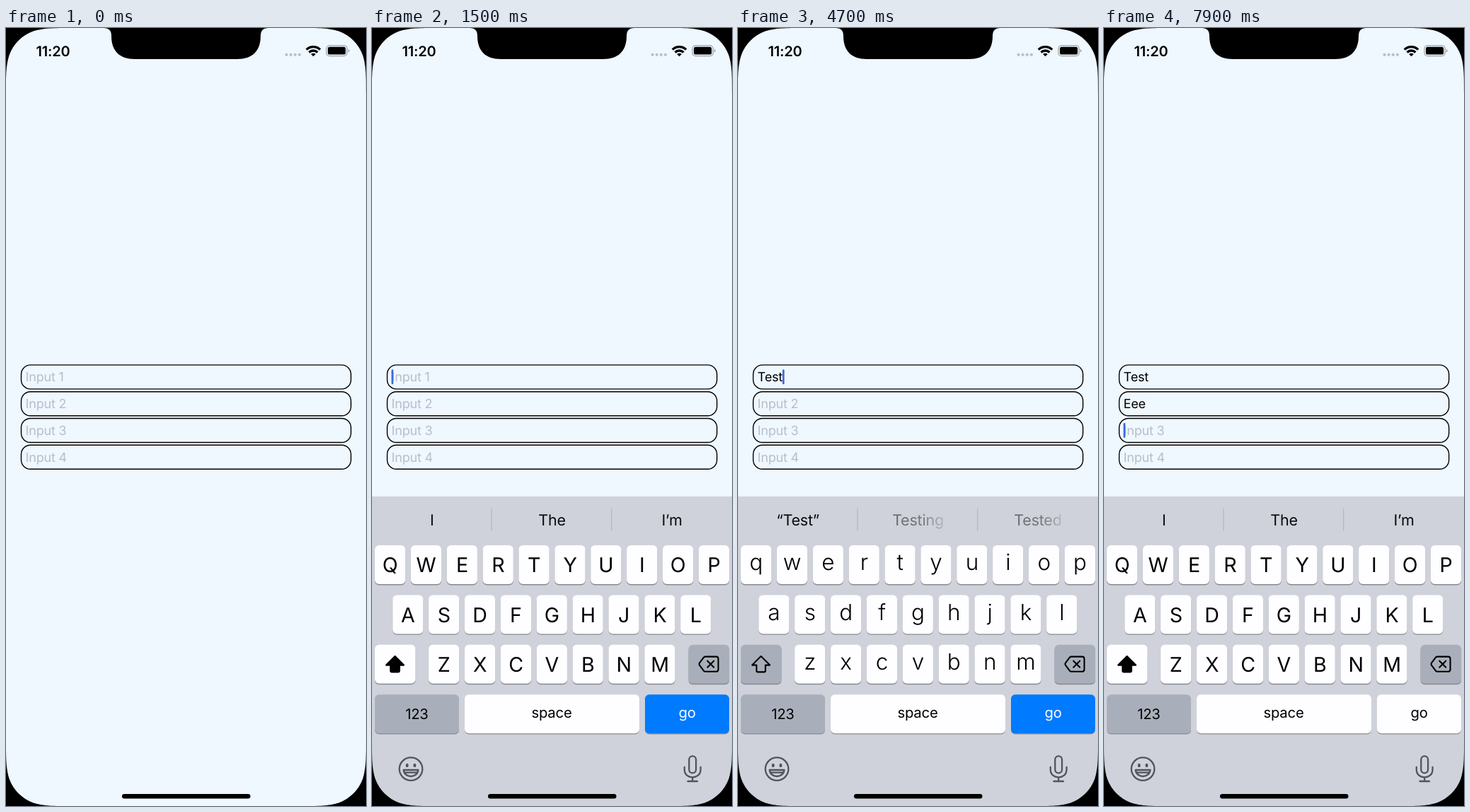
An HTML page for the animation above (8000 ms loop, 509 px wide and 1101 px high).

```html
<!DOCTYPE html>
<html lang="en">
<head>
<meta charset="utf-8">
<title>Form keyboard</title>
<style>
  html, body { margin: 0; width: 100%; height: 100%; overflow: hidden; background: #000; }
  svg { display: block; }
  text { font-family: Inter, Roboto, sans-serif; letter-spacing: -.01em; text-rendering: geometricPrecision; }
  .mid { text-anchor: middle; }
  .line { fill: none; stroke: #000; stroke-width: 2.1; stroke-linejoin: round; stroke-linecap: round; }
  .icon { fill: none; stroke: #50545b; stroke-width: 2.3; stroke-linecap: round; stroke-linejoin: round; }
</style>
</head>
<body>
<svg id="stage" width="509" height="1101" viewBox="0 0 509 1101">
  <defs>
    <linearGradient id="fade">
      <stop offset="0" stop-opacity=".5"/>
      <stop offset=".6" stop-opacity=".42"/>
      <stop offset="1" stop-opacity=".12"/>
    </linearGradient>
    <filter id="shadow" x="-20%" y="-20%" width="140%" height="140%">
      <feDropShadow dx="0" dy="1" stdDeviation="2" flood-color="#000" flood-opacity=".32"/>
    </filter>
  </defs>
  <rect width="509" height="1101" fill="#eff7ff"/>
  <g id="form"></g>
  <rect id="caret" width="2.7" height="21" rx="1.3" fill="#3b68dc"/>
  <g id="board"></g>
  <g id="status">
    <text x="42.5" y="39.8" font-size="20" font-weight="600">11:20</text>
    <g fill="#b9bfc8">
      <circle cx="396.6" cy="37.8" r="2.1"/><circle cx="402.7" cy="37.8" r="2.1"/>
      <circle cx="408.8" cy="37.8" r="2.1"/><circle cx="414.9" cy="37.8" r="2.1"/>
    </g>
    <g fill="none" stroke="#000" stroke-width="3.3">
      <path d="M424.8 30.6A13.8 13.8 0 0 1 444.2 30.6"/>
      <path d="M428.5 34.5A8.5 8.5 0 0 1 440.5 34.5"/>
    </g>
    <path d="M434.5 40.3L431.2 37A4.7 4.7 0 0 1 437.8 37Z"/>
    <rect x="453" y="24.8" width="29.2" height="14.8" rx="4.4" fill="none" stroke="#9da2a8" stroke-width="1.3"/>
    <rect x="455" y="26.8" width="25.2" height="10.8" rx="2.6"/>
    <path d="M483.8 29.8Q485.6 30.6 485.6 32.2T483.8 34.6Z" fill="#9da2a8"/>
  </g>
  <path d="M138 0Q149 0 149 11C149 33 161 44 182 44H327C348 44 360 33 360 11Q360 0 371 0Z"/>
  <rect x="164" y="1084" width="181.5" height="6.6" rx="3.3"/>
  <path id="mask" fill-rule="evenodd"/>
</svg>
<script>
const $ = id => document.getElementById(id);
const LOOP = 8000, STEP = 100;
const LIGHT = '#fefdff', GREY = '#a9afba', BLUE = '#007aff';
const PITCH = 50.87, KEY_W = 43.2, KEY_H = 55, ROW = 70.4, TOP = 732;

function add(parent, tag, attrs, text) {
  const el = document.createElementNS('http://www.w3.org/2000/svg', tag);
  set(el, attrs);
  if (text) el.textContent = text;
  parent.appendChild(el);
  return el;
}
function set(el, attrs) {
  for (const k in attrs) el.setAttribute(k, attrs[k]);
}

// Screen outline with continuous corners
function corner(x, y, sx, sy) {
  const r = 61, p = (a, b) => `${x + sx * a * r} ${y + sy * b * r}`;
  return `M${p(0, 0)}L${p(0, 1.529)}C${p(0, 1.088)} ${p(0, .868)} ${p(.075, .631)}` +
    `C${p(.169, .373)} ${p(.373, .169)} ${p(.631, .075)}` +
    `C${p(.868, 0)} ${p(1.088, 0)} ${p(1.529, 0)}Z`;
}
set($('mask'), { d: corner(0, 0, 1, 1) + corner(509, 0, -1, 1) + corner(0, 1101, 1, -1) + corner(509, 1101, -1, -1) });

// Input fields
const fieldY = i => 476.9 + i * 37.8;
const inputs = [0, 1, 2, 3].map(i => {
  add($('form'), 'rect', { x: 21.5, y: fieldY(i), width: 466.2, height: 34, rx: 13, fill: 'none', stroke: '#000', 'stroke-width': 1.4 });
  return add($('form'), 'text', { x: 27.6, y: fieldY(i) + 23.5, 'font-size': 18 });
});

// Keyboard
const board = $('board');
add(board, 'rect', { y: 663, width: 509, height: 440, fill: '#cfd2da' });
for (const x of [169, 338.7]) add(board, 'rect', { x: x - .6, y: 680, width: 1.2, height: 32, fill: '#b3b6be' });
const words = [84.7, 254.5, 424].map(x => add(board, 'text', { class: 'mid', x, y: 704, 'font-size': 21.5 }));

function cap(x, y, w, fill) {
  add(board, 'rect', { x, y: y + 1.4, width: w, height: KEY_H, rx: 6, fill: '#888a8f' });
  return add(board, 'rect', { x, y, width: w, height: KEY_H, rx: 6, fill });
}
const keys = {};
[['qwertyuiop', 4], ['asdfghjkl', 29.2], ['zxcvbnm', 80.1]].forEach(([row, left], r) => {
  [...row].forEach((ch, i) => {
    const x = left + i * PITCH, y = TOP + r * ROW;
    cap(x, y, KEY_W, LIGHT);
    keys[ch] = { x, y, label: add(board, 'text', { class: 'mid', x: x + KEY_W / 2 }) };
  });
});
const row3 = TOP + 2 * ROW, row4 = TOP + 3 * ROW;
const shiftKey = cap(4, row3, 57.5, GREY);
const arrow = add(board, 'path', { class: 'line', d: 'M32.5 889L45 901.6H38.8V909.6Q38.8 911.4 37 911.4H28Q26.2 911.4 26.2 909.6V901.6H20Z' });
cap(447.6, row3, 57.5, GREY);
add(board, 'path', { class: 'line', d: 'M471.5 889.6H486.5Q489.6 889.6 489.6 892.7V907.7Q489.6 910.8 486.5 910.8H471.5Q470 910.8 469 909.7L463 901.7Q462 900.2 463 898.7L469 890.7Q470 889.6 471.5 889.6ZM474.3 895.7L483.3 904.7M483.3 895.7L474.3 904.7' });
cap(4, row4, 119, GREY);
cap(131, row4, 247, LIGHT);
const goKey = cap(386, row4, 119, BLUE);
const label = (x, y, s) => add(board, 'text', { class: 'mid', x, y, 'font-size': 20.3 }, s);
label(63.4, 977.6, '123');
label(254, 975.6, 'space');
const goLabel = label(445.7, 975.6, 'go');

// Emoji and dictation icons
add(board, 'circle', { class: 'icon', cx: 55, cy: 1048.6, r: 16.3 });
for (const x of [49.6, 60.4]) add(board, 'ellipse', { cx: x, cy: 1043.4, rx: 2, ry: 2.7, fill: '#50545b' });
add(board, 'path', { class: 'icon', 'stroke-width': 2, d: 'M44.6 1050H65.4C64 1062 46 1062 44.6 1050ZM46 1053.6H64' });
add(board, 'rect', { class: 'icon', x: 448.3, y: 1030.4, width: 9.8, height: 24, rx: 4.9 });
add(board, 'path', { class: 'icon', d: 'M441.8 1046V1049.5C441.8 1064 464.6 1064 464.6 1049.5V1046M453.2 1060.6V1066M446.5 1066H460' });

// Pressed-key bubble
const bubble = add(board, 'g', {});
const bubbleShape = add(bubble, 'path', { fill: LIGHT, filter: 'url(#shadow)' });
const bubbleText = add(bubble, 'text', { class: 'mid', 'font-size': 46, 'font-weight': 300 });

function showBubble(ch, caps) {
  set(bubble, { display: ch ? 'inline' : 'none' });
  if (!ch) return;
  const { x, y } = keys[ch], w = KEY_W;
  set(bubbleShape, {
    d: `M${x - 4} ${y - 85}h${w + 8}q13 0 13 13V${y - 30}c0 9 -4 13 -8 17s-9 8 -9 20V${y + 50}q0 6 -6 6` +
      `h${12 - w}q-6 0 -6 -6V${y + 7}c0 -12 -5 -16 -9 -20s-8 -8 -8 -17V${y - 72}q0 -13 13 -13Z`
  });
  set(bubbleText, { x: x + w / 2, y: y - 29.5 });
  bubbleText.textContent = caps ? ch.toUpperCase() : ch;
}

// Timeline: each entry patches the state from its time on
const START = 'I|The|I’m';
const events = [[0, { field: -1, texts: ['', ''], caps: true, pop: '', words: START, fading: false }]];
const at = (t, patch) => events.push([t, patch]);
function press(t, ch, texts) {
  at(t, { pop: ch });
  at(t + 100, { pop: '', texts, caps: false });
}
function suggest(t, list) {
  at(t, { words: list, fading: true });
  at(t + 100, { fading: false });
}
at(500, { field: 0 });
press(3000, 't', ['T', '']);
suggest(3300, '“T”|The|To');
press(3400, 'e', ['Te', '']);
suggest(3700, '“Te”|Tell|Text');
press(3900, 's', ['Tes', '']);
suggest(4200, '“Tes”|Test|Yes');
press(4300, 't', ['Test', '']);
suggest(4700, '“Test”|Testing|Tested');
at(5200, { field: 1, caps: true, words: START });
press(6000, 'e', ['Test', 'E']);
suggest(6300, '“E”|Even|Every');
press(6900, 'e', ['Test', 'Ee']);
press(7200, 'e', ['Test', 'Eee']);
suggest(7500, '“Eee”|Need|See');
at(7700, { field: 2, caps: true, words: START });
events.sort((a, b) => a[0] - b[0]);

const clamp = v => Math.max(0, Math.min(1, v));
function blink(ms) {
  const p = ms % 1000;
  return ms < 400 ? 1 : p < 400 ? 1 : clamp(Math.max(1 - (p - 400) / 200, (p - 700) / 300));
}
function slide(t) {
  const k = Math.max(0, t - 428) * .018;
  return 438 * (1 + k) * Math.exp(-k);
}

function draw(t) {
  const s = {};
  let since = 0;
  for (const [time, patch] of events) {
    if (time > t) break;
    Object.assign(s, patch);
    since = time;
  }
  inputs.forEach((el, i) => {
    const v = s.texts[i];
    el.textContent = v || `Input ${i + 1}`;
    set(el, { fill: v ? '#000' : '#b7bec9' });
  });
  const on = s.field >= 0;
  set($('caret'), { opacity: on ? blink(t - since) : 0 });
  if (on) {
    const w = s.texts[s.field] ? inputs[s.field].getComputedTextLength() : 0;
    set($('caret'), { x: 27.5 + w, y: fieldY(s.field) + 6.4 });
  }
  set(board, { display: on ? 'inline' : 'none', transform: `translate(0 ${on ? slide(t).toFixed(2) : 438})` });
  s.words.split('|').forEach((word, i) => {
    words[i].textContent = word;
    set(words[i], { fill: s.fading && i ? 'url(#fade)' : '#0b0b0d' });
  });
  for (const ch in keys) {
    const { y, label } = keys[ch];
    label.textContent = s.caps ? ch.toUpperCase() : ch;
    set(label, { y: y + (s.caps ? 38.4 : 35.2), 'font-size': s.caps ? 28.6 : 31.5, 'font-weight': s.caps ? 400 : 350 });
  }
  set(shiftKey, { fill: s.caps ? LIGHT : GREY });
  set(arrow, { style: `fill:${s.caps ? '#000' : 'none'}` });
  const goDown = t >= 5000 && t < 5300 || t >= 7700;
  set(goKey, { fill: goDown ? LIGHT : BLUE });
  set(goLabel, { fill: goDown ? '#000' : '#fff' });
  showBubble(s.pop, s.caps);
}

let last = -1;
function frame() {
  const t = Math.floor(performance.now() % LOOP / STEP) * STEP;
  if (t !== last) draw(last = t);
  requestAnimationFrame(frame);
}
frame();
</script>
</body>
</html>
```
